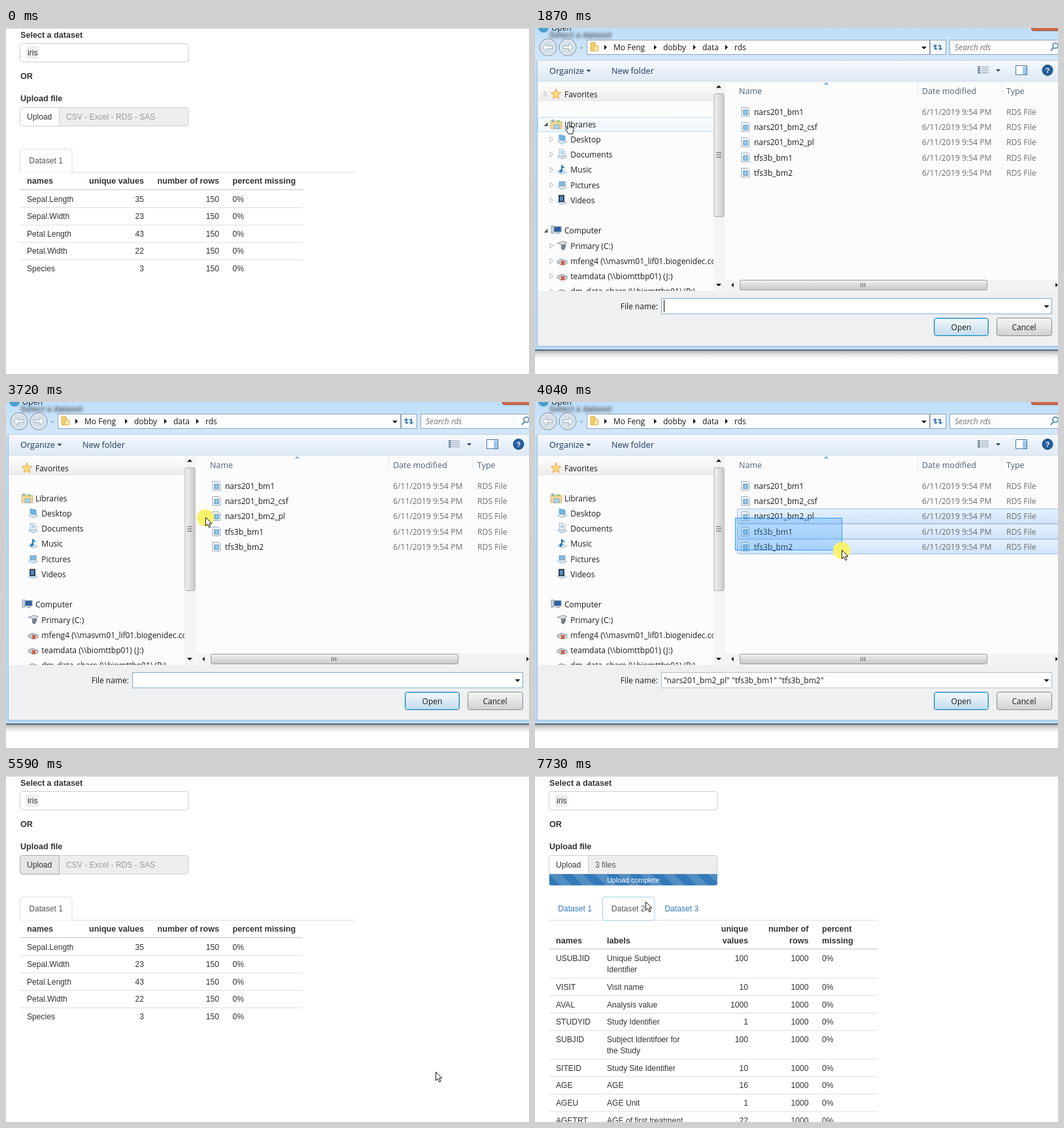
These frames come from a looping animation (800 by 529 pixels, 8000 ms). An HTML page:

```html
<!DOCTYPE html>
<html lang="en">
<head>
<meta charset="utf-8">
<title>Dataset upload</title>
<style>
  html, body { margin: 0; width: 100%; height: 100%; overflow: hidden; background: #fff; }
  svg { display: block; width: 800px; height: 529px; }
  text { font: 12.1px "Liberation Sans", sans-serif; fill: #333; }
  .bold { font-weight: bold; font-size: 12.6px; }
  .small { font-size: 10.7px; fill: #fff; }
  .link { fill: #337ab7; }
  .hover { fill: #23527c; }
  .active { fill: #555; }
  .muted { fill: #999; }
  .ui { font: 12px "Open Sans", sans-serif; fill: #1a1a1a; }
  .tool { font-size: 12.7px; fill: #1e395b; }
  .head { font-size: 12.5px; fill: #4c607a; }
  .dim { font-size: 12.2px; fill: #6d6d6d; }
  .search { font-style: italic; fill: #757575; }
</style>
</head>
<body>
<svg id="stage" viewBox="0 0 800 529" xmlns="http://www.w3.org/2000/svg"></svg>
<script>
const LOOP = 8000;

// ---- helpers ----
const text = (x, y, str, cls = '', anchor = 'start') =>
  `<text x="${x}" y="${y}" class="${cls}" text-anchor="${anchor}">${str}</text>`;
const ui = (x, y, str, cls = '', anchor) => text(x, y, str, 'ui ' + cls, anchor);
const rect = (x, y, w, h, fill, stroke = 'none', rx = 0) =>
  `<rect x="${x}" y="${y}" width="${w}" height="${h}" fill="${fill}" stroke="${stroke}" rx="${rx}"/>`;
const path = (d, fill, stroke = 'none', width = 1) =>
  `<path d="${d}" fill="${fill}" stroke="${stroke}" stroke-width="${width}"/>`;
const circle = (x, y, r, fill, stroke = 'none') =>
  `<circle cx="${x}" cy="${y}" r="${r}" fill="${fill}" stroke="${stroke}"/>`;
const rule = (x1, x2, y, color = '#ddd', width = 1) => path(`M${x1} ${y}H${x2}`, 'none', color, width);
const move = (x, y, body) => `<g transform="translate(${x} ${y})">${body}</g>`;
const during = (from, to, body) => `<g data-from="${from}" data-to="${to}">${body}</g>`;
const gradient = (id, ...colors) =>
  `<linearGradient id="${id}" x2="0" y2="1">${colors.map((c, i) =>
    `<stop offset="${i / (colors.length - 1)}" stop-color="${c}"/>`).join('')}</linearGradient>`;
const triangle = (x, y, angle, size = 3.5, fill = '#111') =>
  `<path transform="translate(${x} ${y}) rotate(${angle})" d="M${-size / 2} ${-size}L${size / 2} 0L${-size / 2} ${size}z" fill="${fill}"/>`;

const defs = `<defs>
  ${gradient('glass', '#bddefa', '#cbe4fa', '#d3e7f9')}
  ${gradient('edge', '#c0dff9', '#b2d8f8', '#b7dbf9')}
  ${gradient('toolbar', '#f8fbfe', '#e8f0f9', '#dfe9f5')}
  ${gradient('favorites', '#fafafa', '#ebebeb')}
  ${gradient('hoverRow', '#fbfdff', '#ecf5fe')}
  ${gradient('selected', '#e6f1fd', '#d0e4fb')}
  ${gradient('button', '#f3f3f3', '#ebebeb', '#dddddd', '#d2d2d2')}
  ${gradient('openButton', '#f0f6fa', '#e5f0f7', '#d2e4f0', '#c8deec')}
  ${gradient('thumb', '#f2f2f2', '#dcdcdc', '#c8c8c8')}
  ${gradient('thumbHot', '#e1f3fc', '#bfe3f8', '#9bd0ee')}
  ${gradient('shadow', '#a8a8a8', '#e2e2e2', '#fff')}
  <linearGradient id="thumbV"><stop stop-color="#f2f2f2"/><stop offset="1" stop-color="#cacaca"/></linearGradient>
  <pattern id="stripes" width="34.8" height="34.8" patternUnits="userSpaceOnUse" patternTransform="translate(21.5 150) skewX(45)">
    ${rect(0, 0, 34.8, 34.8, '#337ab7')}${rect(0, 0, 17.4, 34.8, '#528ec2')}
  </pattern>
  <clipPath id="bar"><path d="M21.5 150H279V163.500q0 4-4 4H25.500q-4 0-4-4z"/></clipPath>
  <clipPath id="tree"><rect x="4" y="82" width="269" height="320"/></clipPath>
  <filter id="blur"><feGaussianBlur stdDeviation="2.2"/></filter>
</defs>`;

// ---- web page ----
const uploadButton = (fill, stroke) =>
  path('M81.500 121.500H25.500q-4 0-4 4V146q0 4 4 4H81.500z', fill, stroke) + text(32, 140, 'Upload');

const tabBox = (x, fill, stroke) =>
  path(`M${x} 220.500V189q0-4 4-4h71.500q4 0 4 4V220.500`, fill, stroke);
const tabLine = end => rule(21.5, end, 220.5);
const tabLabel = (n, cls) => text(35.2 + (n - 1) * 81.6, 207, 'Dataset ' + n, cls);

const form = rule(0, 800, 0.5, '#d4d4d8')
  + text(22, 15, 'Select a dataset', 'bold')
  + rect(21.5, 23.5, 257.5, 28.5, '#fff', '#ccc', 4)
  + rect(30, 28, 20.5, 19, '#efefef', 'none', 3) + text(33, 42, 'iris')
  + text(22, 78, 'OR', 'bold') + text(22, 112, 'Upload file', 'bold')
  + path('M81.500 121.500H275q4 0 4 4V146q0 4-4 4H81.500z', '#eee', '#ccc')
  + uploadButton('#fff', '#ccc')
  + during(910, 1870, uploadButton('#e6e6e6', '#adadad'))
  + during(5590, 5890, uploadButton('#e6e6e6', '#adadad'));

function irisTable() {
  const rows = [['Sepal.Length', 35], ['Sepal.Width', 23], ['Petal.Length', 43], ['Petal.Width', 22], ['Species', 3]];
  let out = text(32, 238, 'names', 'bold') + text(211, 238, 'unique values', 'bold', 'end')
    + text(326, 238, 'number of rows', 'bold', 'end') + text(346.5, 238, 'percent missing', 'bold')
    + rule(21.5, 454, 247, '#ddd', 2);
  rows.forEach(([name, unique], i) => {
    const y = 265.5 + i * 26.6;
    out += text(32, y, name) + text(211, y, unique, '', 'end') + text(326, y, 150, '', 'end') + text(346.5, y, '0%');
    if (i) out += rule(21.5, 454, y - 17.5);
  });
  return out;
}

function clinicalTable(labelX, total, subjects, age, treated) {
  const rows = [
    ['USUBJID', ['Unique Subject', 'Identifier'], subjects], ['VISIT', ['Visit name'], 10],
    ['AVAL', ['Analysis value'], total], ['STUDYID', ['Study Identifier'], 1],
    ['SUBJID', ['Subject Identifoer for', 'the Study'], subjects], ['SITEID', ['Study Site Identifier'], 10],
    ['AGE', ['AGE'], age], ['AGEU', ['AGE Unit'], 1], ['AGETRT', ['AGE of first treatment'], treated]];
  const head = (x, a, b, anchor) => text(x, 238, a, 'bold', anchor) + text(x, 255.5, b, 'bold', anchor);
  let y = 283;
  let out = head(32, '', 'names') + head(labelX, '', 'labels') + head(326, 'unique', 'values', 'end')
    + head(418.5, 'number of', 'rows', 'end') + head(439, 'percent', 'missing')
    + rule(21.5, 524, 264.5, '#ddd', 2);
  rows.forEach(([name, label, unique], i) => {
    if (i) out += rule(21.5, 524, y - 17.8);
    out += text(32, y, name) + label.map((s, k) => text(labelX, y + k * 17.3, s)).join('')
      + text(326, y, unique, '', 'end') + text(418.5, y, total, '', 'end') + text(439, y, '0%');
    y += 26.7 + (label.length - 1) * 17.1;
  });
  return out;
}

const progress = width => `<g clip-path="url(#bar)">${rect(21.5, 150, 257.5, 17.5, '#f5f5f5')}
  ${rect(21.5, 150, width, 17.5, 'url(#stripes)')}</g>` + text(21.5 + width / 2, 162.5, 'Upload complete', 'small', 'middle');

const beforeUpload = text(92, 140, 'CSV - Excel - RDS - SAS', 'muted')
  + tabLine(533) + tabBox(21.5, '#fff', '#ddd') + tabLabel(1, 'active') + irisTable();

const afterUpload = text(92, 140, '3 files', 'active')
  + during(5890, 6490, progress(155)) + during(6490, LOOP, progress(257.5))
  + tabLine(524)
  + during(5890, 7730, tabBox(21.5, '#fff', '#ddd') + tabLabel(1, 'active') + clinicalTable(109, 500, 50, 28, 30))
  + during(5890, 7410, tabLabel(2, 'link'))
  + during(7410, 7730, tabBox(103.5, '#eee', 'none') + tabLabel(2, 'hover'))
  + during(5890, 6800, tabLabel(3, 'link'))
  + during(6800, 7410, tabBox(185, '#eee', 'none') + tabLabel(3, 'hover'))
  + during(7410, LOOP, tabLabel(3, 'link'))
  + during(7730, LOOP, tabLabel(1, 'link')
    + `<rect x="103.5" y="185" width="79.500" height="36" rx="4" fill="#fff" stroke="#2f9bb5" stroke-dasharray="1 1"/>`
    + tabLabel(2, 'active') + clinicalTable(110, 1000, 100, 16, 22));

// ---- file dialog ----
const tray = path('M1 11l8-3 7 4-8 3z', '#d5e2ec', '#a3b6c5', .8);
const icons = {
  star: path('M8 0l2.300 5 5.500.7-4 3.800 1 5.500L8 12.300 3.200 15l1-5.500-4-3.800 5.500-.7z', '#fbd77e', '#e09a3a', .8),
  folder: path('M0 2h6l1 2h10v11H0z', '#f3d793', '#d0a655', .8) + rect(2, 1, 3, 4, '#7cb7dc') + rect(9, 2, 5, 3, '#9ccb86') + rect(5, 9, 8, 6, '#a9d4ee', '#7fb1d2'),
  desktop: tray + path('M4 1l9 2v7L4 8z', '#6db7e6', '#5590b8', .8),
  documents: tray + path('M4 0h6l3 3v7H4z', '#f6f9fc', '#8aa0b3', .8) + path('M6 4h5M6 6.500h5', 'none', '#5a9bd0'),
  music: tray + path('M8 10V1q1 3 4 4', 'none', '#247cc0', 2) + circle(6.5, 10, 2.4, '#247cc0'),
  pictures: tray + rect(4, 3, 9, 6, '#7dbde6', '#7d98ad'),
  videos: tray + rect(3, 0, 9, 11, '#33404d') + rect(5, 2, 5, 7, '#4f8cc9'),
  computer: rect(5, 2, 11, 8, '#2d5fa8', '#8999a8') + rect(1, 1, 4, 11, '#d0d6dc', '#8d99a5') + rect(8, 11, 6, 2, '#a9b3bd'),
  drive: path('M1 4l9-3 6 2-6 4z', '#d9dee3', '#7c8791', .8) + path('M7 6h7v4l-3 5-4-2z', '#77828c'),
  share: path('M1 8l6-3 9 3v4l-8 2-7-3z', '#c7cdd2', '#7d868e', .8) + path('M7 8l5 6M12 8l-5 6', 'none', '#cf4f2d', 2),
  file: path('M.5.5h9l2.500 2.500v11H.5z', '#fff', '#8ba0b1') + rect(3, 4, 7, 8, '#4a95c5') + path('M4.500 6h4M4.500 8h4M4.500 10h4', 'none', '#fff'),
};

const treeY = row => 147 + row * 23.25;
const treeItems = [
  [0, 0, 'folder', 'Libraries'], [1, 1, 'desktop', 'Desktop'], [2, 1, 'documents', 'Documents'],
  [3, 1, 'music', 'Music'], [4, 1, 'pictures', 'Pictures'], [5, 1, 'videos', 'Videos'],
  [7, 0, 'computer', 'Computer'], [8, 1, 'drive', 'Primary (C:)'],
  [9, 1, 'share', 'mfeng4 (\\\\masvm01_lif01.biogenidec.com)'],
  [10, 1, 'share', 'teamdata (\\\\biomttbp01) (J:)'], [11, 1, 'share', 'dm_data_share (\\\\biomttbp01) (P:)']];

const treeArrow = (row, depth) => {
  const y = treeY(row);
  return depth ? path(`M23 ${y - 4}l5 4-5 4z`, '#fff', '#b5b5b5') : path(`M19.500 ${y - 3}v6h-6z`, '#555');
};
const arrows = path('M14 97l5 4-5 4z', '#fff', '#b5b5b5') + treeItems.map(([row, depth]) => treeArrow(row, depth)).join('');

const tree = `<g clip-path="url(#tree)">${rect(4, 82, 269, 320, '#fcfcfc')}
  ${rect(4.5, 90, 268.5, 22, 'url(#favorites)')}
  ${during(1870, 2170, rect(4.5, 136.5, 269, 22, 'url(#hoverRow)', '#c3dffa', 2))}
  ${during(1870, 3100, arrows)}${during(3100, 3720, `<g opacity=".4">${arrows}</g>`)}
  ${move(24, 93, icons.star)}${ui(45, 105.5, 'Favorites')}
  ${treeItems.map(([row, depth, icon, name]) =>
    move(24 + depth * 9, treeY(row) - 8, icons[icon]) + ui(45 + depth * 9.3, treeY(row) + 4.5, name)).join('')}
  </g>`
  + rect(273, 82, 18, 320, '#f5f5f5') + rect(274, 100.5, 15, 188, 'url(#thumbV)', '#adadad', 2)
  + path('M277 190.500h8M277 194h8M277 197.500h8', 'none', '#666')
  + triangle(281, 89.5, -90, 4) + triangle(281, 393, 90, 4);

const files = ['nars201_bm1', 'nars201_bm2_csf', 'nars201_bm2_pl', 'tfs3b_bm1', 'tfs3b_bm2'];
const fileY = i => 128.4 + i * 23.25;
const rowBox = (i, fill, stroke) => rect(309.5, fileY(i) - 11.5, 495, 22.5, fill, stroke, 2);
const hThumb = fill => rect(313.5, 385.5, 378, 15, fill, '#999', 2) + path('M498.500 390v6M501.500 390v6M504.500 390v6', 'none', '#555');
const hButton = x => rect(x, 385.5, 17, 15, 'url(#thumb)', '#aaa', 2);

const fileList = rect(291, 82, 509, 320, '#fcfcfc')
  + during(3100, 3720, rect(301, 82, 284, 22, 'url(#hoverRow)', '#d5e8fa'))
  + path('M585.500 82v22M714.500 82v22', 'none', '#e3e8ee')
  + path('M441.500 86.500l4-4 4 4z', '#8db4d6')
  + ui(312, 101, 'Name', 'head') + ui(592, 101, 'Date modified', 'head') + ui(721, 101, 'Type', 'head')
  + during(2170, 2780, rowBox(1, 'url(#hoverRow)', '#b8d6fb'))
  + during(4040, 5590, [2, 3, 4].map(i => rowBox(i, 'url(#selected)', '#9dbde4')).join(''))
  + files.map((name, i) => move(315.5, fileY(i) - 7.5, icons.file) + ui(335, fileY(i) + 4.5, name)
    + ui(592, fileY(i) + 4.5, '6/11/2019 9:54 PM', 'dim') + ui(721, fileY(i) + 4.5, 'RDS File', 'dim')).join('')
  + rect(292, 385, 508, 16.5, '#f3f3f3') + hThumb('url(#thumb)')
  + during(4940, 5590, hThumb('url(#thumbHot)') + hButton(294.5) + hButton(790.5))
  + triangle(302, 393, 180) + triangle(798, 393, 0);

const navButton = (x, flip) => circle(x, 29.5, 13, '#cfdae4', '#7e8f9f') + circle(x, 29.5, 11.5, '#d6e0e9', '#eef4f9')
  + `<path transform="translate(${x} 29.5) scale(${flip} 1)" d="M-8 0l6-6v4h9v4h-9v4z" fill="#fff" stroke="#9fb0bf"/>`;

const crumbs = [[120, 'Mo Feng'], [196, 'dobby'], [256, 'data'], [305, 'rds']];
const titleBar = rect(0, 0, 800, 493, 'url(#edge)') + rect(0, 0, 800, 50, 'url(#glass)')
  + `<g filter="url(#blur)" opacity=".75">${text(22, 15, 'Select a dataset', 'bold')}</g>`
  + circle(13, -1, 8, '#4b9fcb') + ui(25, 4, 'Open')
  + rect(759.5, -5, 45, 9, '#d26b4b', '#8e3f2b', 3)
  + navButton(20, 1) + navButton(50, -1) + triangle(71, 31, 90, 3.5, '#a9bccf')
  + rect(79.5, 18.5, 524, 22, '#fcfdfe', '#93a3b3') + rect(604.5, 18.5, 24, 22, '#f3f8fd', '#93a3b3')
  + path('M85 22h6l2 3v10H85z', '#f4cd6d', '#d9a63c', .8) + path('M91 27h6v8H89z', '#fbe5a3', '#d9a63c', .8)
  + crumbs.map(([x, name]) => triangle(x - 12, 29.5, 0, 4) + ui(x, 34, name)).join('')
  + triangle(595, 30.5, 90, 4)
  + path('M612 28v4h3M620 31v-4h-3', 'none', '#3b78b8', 2) + triangle(612, 26.5, -90, 3.5, '#3b78b8') + triangle(620, 32.5, 90, 3.5, '#3b78b8')
  + rect(634.5, 18.5, 170, 22, '#fcfdfe', '#93a3b3') + ui(642, 34, 'Search rds', 'search')
  + `<circle cx="796" cy="27" r="4" fill="none" stroke="#4380b5" stroke-width="1.6"/>` + path('M793 30l-4 5', 'none', '#4380b5', 2);

const toolBar = rect(3, 49, 797, 33, 'url(#toolbar)') + rule(3, 800, 49.5, '#b9cfe3') + rule(3, 800, 81.5, '#d3deea')
  + ui(22, 70, 'Organize', 'tool') + triangle(82, 65.5, 90, 3.5, '#1e395b') + ui(117, 70, 'New folder', 'tool')
  + path('M677 59.500h4M677 62.500h4M677 65.500h4M677 68.500h4', 'none', '#5a7896', 2)
  + path('M682 59.500h12M682 62.500h12M682 65.500h12M682 68.500h12', 'none', '#8d9aa8', 1.2)
  + triangle(708.5, 65, 90, 3.5, '#1e395b')
  + rect(735.5, 57.5, 17, 14, '#fff', '#4d759e') + rect(746, 59, 6, 12, '#9cc8ec')
  + circle(784, 64.5, 8, '#245f9f', '#1a4472') + text(784, 69, '?', 'bold small', 'middle');

const nameInput = stroke => rect(193.5, 413.5, 597, 23.5, '#fff', stroke);
const caret = rect(197, 416, 1, 18, '#000');
const fileBox = rect(3, 402, 797, 84.5, '#eff0f1') + ui(188, 430, 'File name:', '', 'end')
  + during(1870, 4040, nameInput('#7fa9cf')) + during(4040, 5590, nameInput('#b3bcc5')) + triangle(782.5, 426, 90, 4)
  + during(1870, 2170, caret) + during(2780, 3100, caret)
  + during(4040, 5590, ui(197, 430, '"nars201_bm2_pl" "tfs3b_bm1" "tfs3b_bm2"'))
  + rect(610.5, 443.5, 83, 27, 'url(#openButton)', '#3c7fb1', 3) + rect(611.5, 444.5, 81, 25, 'none', '#6fd0f5', 2)
  + rect(706.5, 443.5, 84, 27, 'url(#button)', '#8a8a8a', 3)
  + ui(652, 462, 'Open', '', 'middle') + ui(748, 462, 'Cancel', '', 'middle');

const dialog = rect(0, 0, 800, 529, '#fff') + rect(0, 492, 800, 14, 'url(#shadow)') + titleBar + toolBar + tree + fileList + fileBox
  + path('M3.500 50V486.500H800', 'none', '#9db9d3') + rule(0, 800, 492.5, '#3d4a57', 1.4)
  + during(4040, 4660, rect(306.5, 177.5, 163, 49, 'rgba(51,153,255,.28)', '#3399ff'));

// ---- pointer ----
const arrow = path('M.5.500V13.500l3-2.800 2.300 5.200 2.200-1-2.300-5h4.300z', '#fff', '#111');
const hand = path('M4 2q1.500-2.200 3 0v5l5 1.300q1.600.6 1.500 2.400l-.9 4.300-1 4H5.500L1 12.500q-1-1.700.4-2.200 1-.3 2.600 1.700z', '#fff', '#111')
  + path('M7 7v3M9.300 7.800v2.500M11.500 8.500v2', 'none', '#111', .8);
const halo = circle(0, 0, 13, '#f8f36a');

// [from, shape, x, y, pressed]
const pointer = [
  [300, arrow, 332, 277], [910, hand, 27, 125], [1230, hand, 46, 143], [2170, arrow, 480, 150],
  [2780, arrow, 400, 108], [3100, arrow, 330, 92], [3720, arrow, 305, 176, true], [4040, arrow, 469, 226, true],
  [4660, arrow, 594, 365], [4940, arrow, 650, 437], [5590, arrow, 657, 452], [6490, arrow, 645, 449],
  [6800, hand, 241, 194], [7410, hand, 163, 192, true], [7730, arrow, 169, 192]];
const pointerLayer = pointer.map(([from, shape, x, y, pressed], i) => {
  const to = i + 1 < pointer.length ? pointer[i + 1][0] : LOOP;
  const ring = pressed ? move(shape === hand ? 5 : 0, 1, halo) : '';
  return during(from, to, move(x, y, ring + shape));
}).join('');

const stage = document.getElementById('stage');
stage.innerHTML = defs + rect(0, 0, 800, 529, '#fff') + form
  + during(0, 5890, beforeUpload) + during(5890, LOOP, afterUpload)
  + during(1870, 5590, dialog) + pointerLayer;

const timed = [...stage.querySelectorAll('[data-from]')].map(el => ({ el, from: +el.dataset.from, to: +el.dataset.to }));
const start = performance.now();
function render() {
  const t = (performance.now() - start) % LOOP;
  for (const { el, from, to } of timed) el.style.display = t >= from && t < to ? '' : 'none';
  requestAnimationFrame(render);
}
render();
</script>
</body>
</html>
```
